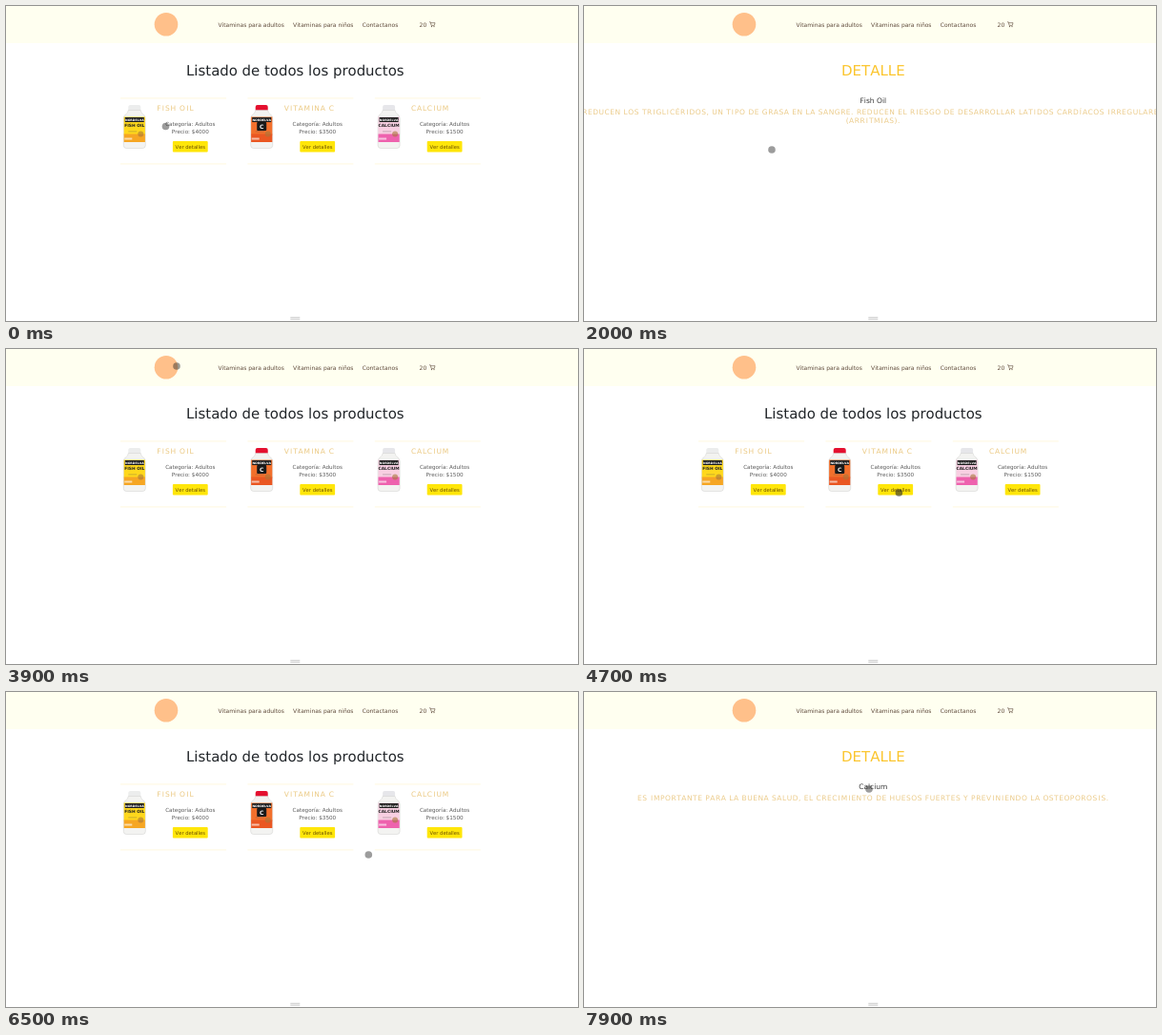
An HTML page that plays this animation: 600 px wide and 331 px high, repeating every 8 s.

```html
<!DOCTYPE html>
<html lang="es">
<head>
<meta charset="utf-8">
<title>Tienda de vitaminas</title>
<style>
  html, body { margin: 0; height: 100%; overflow: hidden; background: #fff; }
  svg { display: block; width: 600px; height: 331px; }
  text { font-family: "DejaVu Sans", sans-serif; text-rendering: geometricPrecision; font-kerning: none; white-space: pre; }
  .mid { text-anchor: middle; }
  .bold { font-weight: bold; }
  .title { letter-spacing: .74px; }
  .info { letter-spacing: .51px; }
  .wide { letter-spacing: 1px; }
</style>
</head>
<body>
<svg id="stage" viewBox="0 0 600 331"></svg>
<script>
const stage = document.getElementById('stage');
const CENTER = 303.3;

const text = (x, y, size, fill, label, style = 'mid') =>
  `<text x="${x}" y="${y}" font-size="${size}" fill="${fill}" class="${style}">${label}</text>`;
const rect = (x, y, w, h, fill, r = 0) =>
  `<rect x="${x}" y="${y}" width="${w}" height="${h}" fill="${fill}" rx="${r}"/>`;
const circle = (x, y, r, fill) => `<circle cx="${x}" cy="${y}" r="${r}" fill="${fill}"/>`;
// Capitals with a roomier I
const caps = label => label.toUpperCase().replace(/[IÍ]/g, '<tspan dx=".47" class="wide">$&</tspan>');

const products = [
  { name: 'Fish Oil', label: 'FISH OIL', price: 4000, cap: '#eceded', top: '#ffd81c', low: '#f6a623',
    lines: ['Reducen los triglicéridos, un tipo de grasa en la sangre. Reducen el riesgo de desarrollar latidos cardíacos irregulares',
            '(arritmias).'] },
  { name: 'Vitamina C', label: 'C', price: 3500, cap: '#e4102f', top: '#f2702c', low: '#ea5722',
    lines: ['Es una vitamina hidrosoluble. Es necesaria para el crecimiento y desarrollo normales.'] },
  { name: 'Calcium', label: 'CALCIUM', price: 1500, cap: '#e6e6ea', top: '#f8cfe2', low: '#ee62ae',
    lines: ['Es importante para la buena salud, el crecimiento de huesos fuertes y previniendo la osteoporosis.'] },
];
products.forEach((product, i) => product.left = 119 + 133.4 * i);

function bottle({ label, cap, top, low }) {
  const badge = label.length === 1;
  return rect(5, 0.5, 13, 7, cap, 2)
    + '<path d="M5 6H18Q18 9 21 10.5Q23 12 23 15V43Q23 46 20 46H3Q0 46 0 43V15Q0 12 2 10.5Q5 9 5 6Z" fill="#f3f3f1" stroke="#cfcfcc" stroke-width=".5"/>'
    + rect(0.4, 13, 22.2, 19, top) + rect(0.4, 31, 22.2, 8.5, low)
    + rect(1.5, 13.5, 20, 5, '#1a1a1a')
    + text(11.5, 17.2, 3.2, '#fff', 'NORDELVA', 'mid bold')
    + (badge ? rect(6.5, 18.5, 10, 9, '#1a1a1a', 1) : '')
    + text(11.5, badge ? 25.3 : 23.5, badge ? 6 : 4.4, badge ? '#fff' : '#222', label, 'mid bold')
    + rect(5, 28, 9, 0.8, '#5556')
    + circle(18, 31, 3, '#a8763a99') + rect(1, 35, 8, 2, '#fff9');
}

function card(product) {
  const { name, price, left } = product, mid = left + 74.3;
  return rect(left + 1, 96.6, 111, 0.7, '#fff6cf') + rect(left + 1, 165.6, 111, 0.7, '#fff6cf')
    + `<g transform="translate(${left + 4.3} 103.5)">${bottle(product)}</g>`
    + text(left + 39.3, 110.2, 7.5, '#ebc983', caps(name), 'title')
    + text(mid, 125.5, 5.65, '#5c5c5c', 'Categoría: Adultos')
    + text(mid, 134.1, 5.65, '#5c5c5c', 'Precio: $' + price)
    + rect(mid - 18.4, 142, 36.8, 11.5, '#ffe60a', 1)
    + text(mid, 150, 5.25, '#6b5000', 'Ver detalles');
}

const listPage = text(CENTER, 73, 14.93, '#212529', 'Listado de todos los productos')
  + products.map(card).join('');

const detailPage = ({ name, lines }) => text(CENTER, 73.2, 15, '#fbc52d', 'DETALLE')
  + text(CENTER, 102.4, 7.5, '#3a3a3a', name)
  + lines.map((line, i) => text(CENTER, 114.3 + 9 * i, 7.5, '#ebcb8a', caps(line), 'mid info')).join('');

const menu = ['Vitaminas para adultos', 'Vitaminas para niños', 'Contactanos']
  .map(item => `<tspan dx="9.2">${item}</tspan>`).join('');
const header = rect(0, 0, 600, 39, '#fffff0')
  + circle(168, 19.2, 12.3, '#ffc08a')
  + text(213.2, 21.6, 6, '#5f4a3c', menu, '') + text(433.6, 21.6, 6, '#5f4a3c', '20', '')
  + '<path d="M444 16.8h1.2l.9 3.6h3.2l.7-2.7h-4.5" fill="none" stroke="#5f4a3c" stroke-width=".6"/>'
  + circle(446.5, 21.6, 0.6, '#5f4a3c') + circle(449, 21.6, 0.6, '#5f4a3c');
const handle = rect(298.3, 326.8, 10, 0.8, '#bbb') + rect(298.3, 328.7, 10, 0.8, '#bbb');

stage.innerHTML = header + handle
  + [listPage, ...products.map(detailPage)].map(page => `<g class="page">${page}</g>`).join('')
  + '<circle id="cursor" r="3.8" fill="#282828"/>';
const pages = stage.querySelectorAll('.page');
const cursor = document.getElementById('cursor');

// When the list opens and when a product is clicked, in ms
const visits = [{ list: 0, click: 1600 }, { list: 3700, click: 4800 }, { list: 6300, click: 7300 }];
const LOADING = 200;

function pageAt(t) {
  const i = visits.findLastIndex(visit => visit.list <= t);
  const next = visits[i + 1];
  if (t < visits[i].click) return 0;
  const blank = t < visits[i].click + LOADING || (next && t >= next.list - LOADING);
  return blank ? -1 : i + 1;
}

const START = [167.5, 126.5], LOGO = [179, 18];
const button = i => [products[i].left + 78, 151];
const moves = [
  { from: 0, to: 800, goal: button(0) }, { from: 2800, to: 3500, goal: LOGO },
  { from: 3900, to: 4500, goal: button(1) }, { from: 5000, to: 5500, goal: LOGO },
  { from: 6200, to: 6500, goal: [380.3, 171] }, { from: 6500, to: 7000, goal: button(2) },
  { from: 7400, to: 7900, goal: [299, 102] },
];

function cursorAt(t) {
  return moves.reduce((point, { from, to, goal }) => {
    const k = Math.min(1, Math.max(0, (t - from) / (to - from)));
    const ease = k * k * (3 - 2 * k);
    return point.map((value, axis) => value + (goal[axis] - value) * ease);
  }, START);
}

function draw() {
  const t = Math.floor(performance.now() % 8000 / 100) * 100;
  const current = pageAt(t);
  pages.forEach((page, i) => page.setAttribute('visibility', i === current ? 'visible' : 'hidden'));

  const [x, y] = cursorAt(t);
  const pressed = visits.some(({ click }) => Math.abs(t - click) <= 200);
  const away = t >= 2800 && t < 3200;
  cursor.setAttribute('cx', x);
  cursor.setAttribute('cy', y);
  cursor.setAttribute('opacity', away ? 0 : pressed ? 0.6 : 0.46);
  requestAnimationFrame(draw);
}
draw();
</script>
</body>
</html>
```
